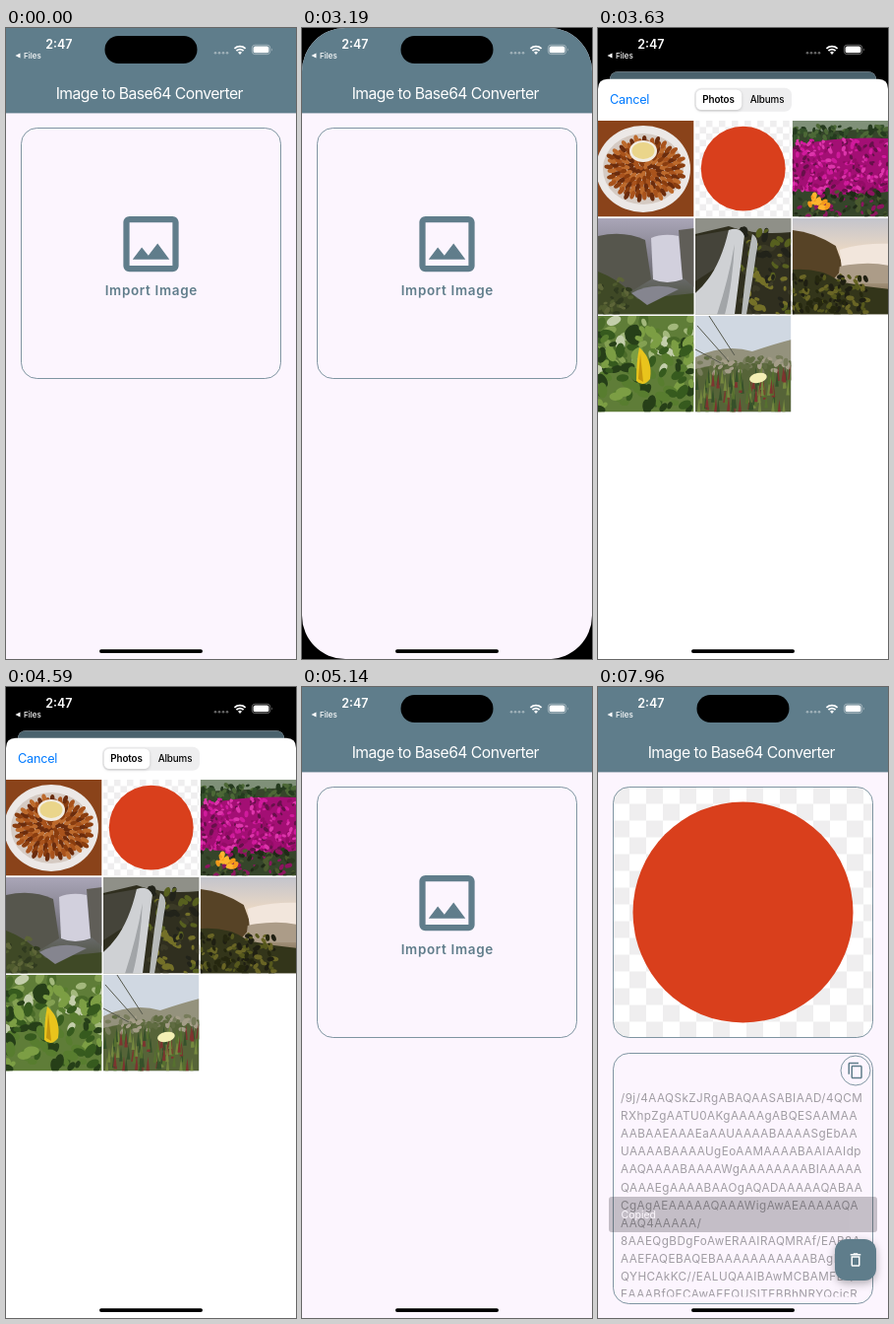
An HTML page for the animation above (8000 ms loop, 295x640 px).

```html
<!DOCTYPE html>
<html lang="en">
<head>
<meta charset="utf-8">
<title>Image to Base64 Converter</title>
<style>
  html, body { margin: 0; width: 100%; height: 100%; overflow: hidden; background: #000; }
  svg { display: block; font-family: Inter, "Liberation Sans", sans-serif; }
  .mid { text-anchor: middle; }
  .line { fill: none; stroke: #607d8b; stroke-width: .8; }
  .fab { filter: drop-shadow(0 3px 4px rgba(0, 0, 0, .3)); }
  .pill { filter: drop-shadow(0 1px 1.5px rgba(0, 0, 0, .18)); }
</style>
</head>
<body>
<svg width="295" height="640" viewBox="0 0 295 640">
  <defs>
    <clipPath id="screenClip"><rect id="screenShape" width="295" height="640"/></clipPath>
    <clipPath id="cardClip"><rect x="15.5" y="101.5" width="264" height="254" rx="16"/></clipPath>
    <clipPath id="textClip"><rect x="16" y="376" width="263" height="242.5"/></clipPath>
    <clipPath id="cellClip"><rect width="97.3" height="97.3"/></clipPath>
    <pattern id="checker" width="34" height="34" patternUnits="userSpaceOnUse">
      <rect width="34" height="34" fill="#fff"/>
      <path d="M0 0h17v34h17V17H0z" fill="#efeeef"/>
    </pattern>
    <linearGradient id="mist" x2="0" y2="1">
      <stop offset="0" stop-color="#aaa6b8"/><stop offset=".5" stop-color="#77757f"/><stop offset="1" stop-color="#3c4526"/>
    </linearGradient>
    <linearGradient id="dusk" x2="0" y2="1">
      <stop offset="0" stop-color="#c3c4cc"/><stop offset=".35" stop-color="#ecd9c4"/><stop offset="1" stop-color="#54452a"/>
    </linearGradient>
    <g id="picture">
      <rect x="-37" width="339" height="254" fill="url(#checker)"/>
      <circle cx="132.5" cy="127" r="112" fill="#d93f1c"/>
    </g>
  </defs>

  <rect width="295" height="640"/>

  <g id="home" clip-path="url(#screenClip)">
    <rect width="295" height="640" fill="#fcf5fe"/>
    <rect width="295" height="86.4" fill="#5f7d8b"/>
    <text class="mid" x="145.8" y="71.5" font-size="15.7" letter-spacing="-.52" fill="#fff">Image to Base64 Converter</text>

    <g id="empty" fill="#607d8b">
      <path transform="translate(110 181.5) scale(3.125)" d="M19 5v14H5V5h14m0-2H5c-1.1 0-2 .9-2 2v14c0 1.1.9 2 2 2h14c1.1 0 2-.9 2-2V5c0-1.1-.9-2-2-2zm-4.86 8.86l-3 3.87L9 13.14 6 17h12l-3.86-5.14z"/>
      <text class="mid" x="147.8" y="271" font-size="13.5" font-weight="600" letter-spacing=".65">Import Image</text>
    </g>

    <g id="result">
      <g clip-path="url(#cardClip)"><use href="#picture" x="15" y="101.5"/></g>
      <rect class="line" x="15.5" y="371.5" width="264" height="254" rx="16"/>
      <g id="code" clip-path="url(#textClip)" font-size="11.7" letter-spacing=".45" fill="#a09ca3"></g>
      <circle class="line" cx="262" cy="389" r="15"/>
      <path transform="translate(253 380) scale(.75)" fill="#607d8b" fill-rule="evenodd" d="M16 1H4c-1.1 0-2 .9-2 2v14h2V3h12V1zm3 4H8c-1.1 0-2 .9-2 2v14c0 1.1.9 2 2 2h11c1.1 0 2-.9 2-2V7c0-1.1-.9-2-2-2zm0 16H8V7h11v14z"/>
      <g id="snack">
        <rect x="11" y="517" width="273" height="36" rx="3" fill="#322f35"/>
        <text x="23.5" y="538.5" font-size="10.5" fill="#fff">Copied</text>
      </g>
      <rect class="fab" x="241" y="560" width="42" height="42" rx="12" fill="#5f7d8b"/>
      <path transform="translate(253 572) scale(.75)" fill="#fff" fill-rule="evenodd" d="M6 19c0 1.1.9 2 2 2h8c1.1 0 2-.9 2-2V7H6v12zM8 9h8v10H8V9zm7.5-5l-1-1h-5l-1 1H5v2h14V4h-3.5z"/>
    </g>

    <rect class="line" x="15.5" y="101.5" width="264" height="254" rx="16"/>
    <rect id="dim" width="295" height="640"/>
  </g>

  <g id="sheet">
    <path d="M0 600V10Q0 0 10 0H285Q295 0 295 10V600z" fill="#fff"/>
    <path id="veil" d="M0 21.5h295v21H0z" fill="#f2eff1"/>
    <text x="12" y="25.8" font-size="12.7" letter-spacing="-.25" fill="#007aff">Cancel</text>
    <rect x="98" y="9" width="99" height="24" rx="7" fill="#eeeeef"/>
    <rect class="pill" x="99.7" y="10.7" width="46.5" height="20.6" rx="5.5" fill="#fff"/>
    <g class="mid" font-size="9.8">
      <text x="122.5" y="24.6" font-weight="600" letter-spacing="-.1">Photos</text>
      <text x="172" y="24.6" font-weight="500" letter-spacing="-.1">Albums</text>
    </g>
    <g id="photos"></g>
  </g>

  <rect x="100.5" y="8" width="94" height="28" rx="14"/>
  <g fill="#fff">
    <text x="40.2" y="21" font-size="12.5" font-weight="600">2:47</text>
    <path d="M9.5 28l5-2.6v5.2z"/>
    <text x="18" y="31" font-size="8" font-weight="500">Files</text>
    <g opacity=".4">
      <circle cx="213" cy="25.3" r="1.3"/><circle cx="217" cy="25.3" r="1.3"/>
      <circle cx="221" cy="25.3" r="1.3"/><circle cx="225" cy="25.3" r="1.3"/>
    </g>
    <path d="M238 27l-2-2.2a2.9 2.9 0 0 1 4 0z"/>
    <path d="M234.4 23.2a5.2 5.2 0 0 1 7.2 0M232.4 20.9a8.2 8.2 0 0 1 11.2 0" fill="none" stroke="#fff" stroke-width="1.8"/>
    <rect x="250.3" y="17.2" width="18.4" height="9.4" rx="3" fill="none" stroke="#fff" stroke-opacity=".5" stroke-width=".8"/>
    <rect x="251.6" y="18.5" width="15.8" height="6.8" rx="1.9"/>
    <path d="M270 20.4q1.4 1.5 0 3z" opacity=".6"/>
  </g>
  <rect x="95" y="630.2" width="105" height="3.8" rx="1.9"/>
</svg>

<script>
const LOOP = 8000;
const $ = id => document.getElementById(id);

// How far the photo sheet is up, by time.
const RISE = [
  [0, 0], [3300, .65], [3410, .93], [3520, .985], [3630, 1],
  [4700, .6], [4810, .148], [4920, .04], [5030, .01], [5140, 0]
];
const SNACK = [[0, 0], [7850, .12], [7960, .27]];
const MODAL = [3190, 5140];
const LOADED = 6960;

const LINES = [
  "/9j/4AAQSkZJRgABAQAASABIAAD/4QCM",
  "RXhpZgAATU0AKgAAAAgABQESAAMAA",
  "AABAAEAAAEaAAUAAAABAAAASgEbAA",
  "UAAAABAAAAUgEoAAMAAAABAAIAAIdp",
  "AAQAAAABAAAAWgAAAAAAAABIAAAAA",
  "QAAAEgAAAABAAOgAQADAAAAAQABAA",
  "CgAgAEAAAAAQAAAWigAwAEAAAAAQA",
  "AAQ4AAAAA/",
  "8AAEQgBDgFoAwERAAIRAQMRAf/EAB8A",
  "AAEFAQEBAQEBAAAAAAAAAAABAgMEBQY",
  "QYHCAkKC//EALUQAAIBAwMCBAMFBQ",
  "EAAABfQECAwAEEQUSITEBBhNRYQcicR"
];
$("code").innerHTML = LINES.map((s, i) =>
  `<text x="23" y="${420.8 + i * 18.15}">${s}</text>`).join("");

let seed = 7;
const rnd = () => (seed = seed * 16807 % 2147483647) / 2147483647;
const shape = (d, fill) => `<path d="${d}" fill="${fill}"/>`;
const fill = c => shape("M0 0h98v98H0z", c);
const oval = (x, y, rx, ry, c, turn = 0) =>
  `<ellipse cx="${x}" cy="${y}" rx="${rx}" ry="${ry}" fill="${c}" transform="rotate(${turn} ${x} ${y})"/>`;

// Scatter n leaves of about size r in the box x, y, w, h.
function scatter(n, x, y, w, h, r, colors) {
  let out = "";
  for (let i = 0; i < n; i++) {
    const size = r * (.6 + rnd() * .8);
    out += oval(x + rnd() * w, y + rnd() * h, size, size * .6, colors[i % colors.length], rnd() * 180);
  }
  return out;
}

function petals() {
  let out = "";
  for (let i = 0; i < 140; i++) {
    const a = i * 2.4, d = Math.sqrt(i / 140);
    out += oval(48 + 39 * d * Math.cos(a), 49 + 31 * d * Math.sin(a), 4.5, 2.3,
      ["#a9531c", "#6b2c0d", "#bd6a2c", "#8a3d0f"][i % 4], a * 57.3);
  }
  return out;
}

function blades() {
  let out = "";
  for (let i = 0; i < 110; i++) {
    const x = rnd() * 98, y = 64 + rnd() * 36;
    out += shape(`M${x} ${y}l2 -15l1.5 15z`, ["#56702f", "#7d342f", "#36502a", "#75883f"][i % 4]);
  }
  return out;
}

const PHOTOS = [
  fill("#8a431a") + oval(46, 49, 48, 44, "#ece8e6") + oval(46, 49, 41, 36, "#d5cac2") +
    petals() + oval(46, 31, 14, 11, "#f1ece2") + oval(46, 30.5, 11.5, 8.5, "#ead58a"),
  `<use href="#picture" transform="translate(-2 0) scale(.3835)"/>`,
  fill("#35452a") + shape("M0 0h98v8L0 12z", "#7f9078") +
    scatter(80, 0, 6, 98, 16, 3, ["#34502a", "#4c6836", "#243a1e"]) +
    shape("M0 28Q30 16 98 18V72Q50 80 0 68z", "#a30f74") +
    scatter(260, 0, 20, 98, 54, 2.4, ["#d01a9c", "#930c66", "#dd35ab", "#661049"]) +
    scatter(100, 0, 72, 98, 26, 3, ["#2c3a20", "#4a5a2e", "#8d1460", "#1f2a17"]) +
    scatter(14, 17, 77, 20, 13, 3.5, ["#f59a1b", "#ffb52e"]),
  fill("url(#mist)") + shape("M0 18Q26 12 48 22L54 62L34 74L0 66z", "#56564d") +
    shape("M82 12L98 10V70L86 60z", "#605e58") + shape("M54 20Q66 15 82 18L86 62Q70 68 56 62z", "#d2d0dd") +
    shape("M0 54Q22 62 40 82L98 76V98H0z", "#3f4926") + shape("M34 76Q56 64 82 72L50 88z", "#85858f") +
    scatter(40, 0, 62, 34, 36, 3, ["#4f5b2e", "#303a1f", "#5d6538"]),
  fill("#302f1f") + shape("M0 0h98v14Q60 18 34 8L0 16z", "#8f9088") +
    shape("M0 18L34 12L28 46L0 64z", "#45443a") +
    scatter(80, 46, 12, 52, 86, 4, ["#57601f", "#22231a", "#747028", "#3b3a26"]) +
    shape("M34 12Q46 8 50 18Q46 50 40 98H0V76Q24 56 34 12z", "#cfd1d4") +
    shape("M58 16Q66 20 62 36Q58 66 52 98H47Q52 46 58 16z", "#b7baba") +
    shape("M22 98Q34 62 40 26Q38 68 30 98z", "#a2a5a8"),
  fill("url(#dusk)") + shape("M0 12Q22 14 44 28L52 50L40 64L0 68z", "#574326") +
    shape("M48 32Q70 25 98 26V50Q70 54 50 50z", "#f2e6dc") + shape("M48 49Q76 43 98 48V66H46z", "#ac9c88") +
    shape("M0 52Q30 50 48 64Q74 70 98 72V98H0z", "#33351a") +
    scatter(110, 0, 58, 76, 40, 3, ["#56581d", "#25270f", "#696525", "#1f1f12"]),
  fill("#5f7d38") + scatter(40, 0, 0, 98, 56, 6, ["#a3b87c", "#4a6b29", "#84a052", "#c3ceab"]) +
    scatter(100, 0, 14, 98, 84, 6, ["#365a1e", "#587d2f", "#263f18", "#7c9e44"]) +
    shape("M42 32Q56 44 53 64Q46 73 39 66Q39 46 42 32z", "#e9c41c") + shape("M43 38L46 67L41 64z", "#c4960f"),
  fill("#d0d8e2") + shape("M0 42Q30 28 58 36Q82 28 98 24V66H0z", "#94927d") +
    shape("M0 54Q40 44 98 50V98H0z", "#566438") + scatter(60, 0, 42, 98, 16, 3.2, ["#777c5b", "#606c42", "#a49d88"]) +
    blades() + `<path d="M2 10L34 46M14 0L40 40M0 34L26 48" stroke="#55584c" fill="none"/>` +
    oval(64, 63, 9, 5, "#f3efb4", -12)
];
$("photos").innerHTML = PHOTOS.map((p, i) =>
  `<g transform="translate(${i % 3 * 98.9} ${42.2 + Math.floor(i / 3) * 99})" clip-path="url(#cellClip)">${p}</g>`).join("");

const valueAt = (table, t) => table.filter(row => row[0] <= t).pop()[1];
const show = (id, on) => $(id).style.display = on ? "" : "none";

function draw(t) {
  const p = valueAt(RISE, t);
  const modal = t >= MODAL[0] && t < MODAL[1];
  const shrink = .081 * p;
  $("home").setAttribute("transform", `translate(${147.5 * shrink} ${44.2 * p}) scale(${1 - shrink})`);
  $("screenShape").setAttribute("rx", modal ? 44 - 35 * p : 0);
  $("dim").setAttribute("opacity", .22 * p);
  $("sheet").setAttribute("transform", `translate(0 ${640 - 588.3 * p})`);
  show("sheet", p > 0);
  show("veil", t < 3520);
  show("empty", t < LOADED);
  show("result", t >= LOADED);
  $("snack").setAttribute("opacity", valueAt(SNACK, t));
}

const start = performance.now();
function tick() {
  draw((performance.now() - start) % LOOP);
  requestAnimationFrame(tick);
}
tick();
</script>
</body>
</html>
```
